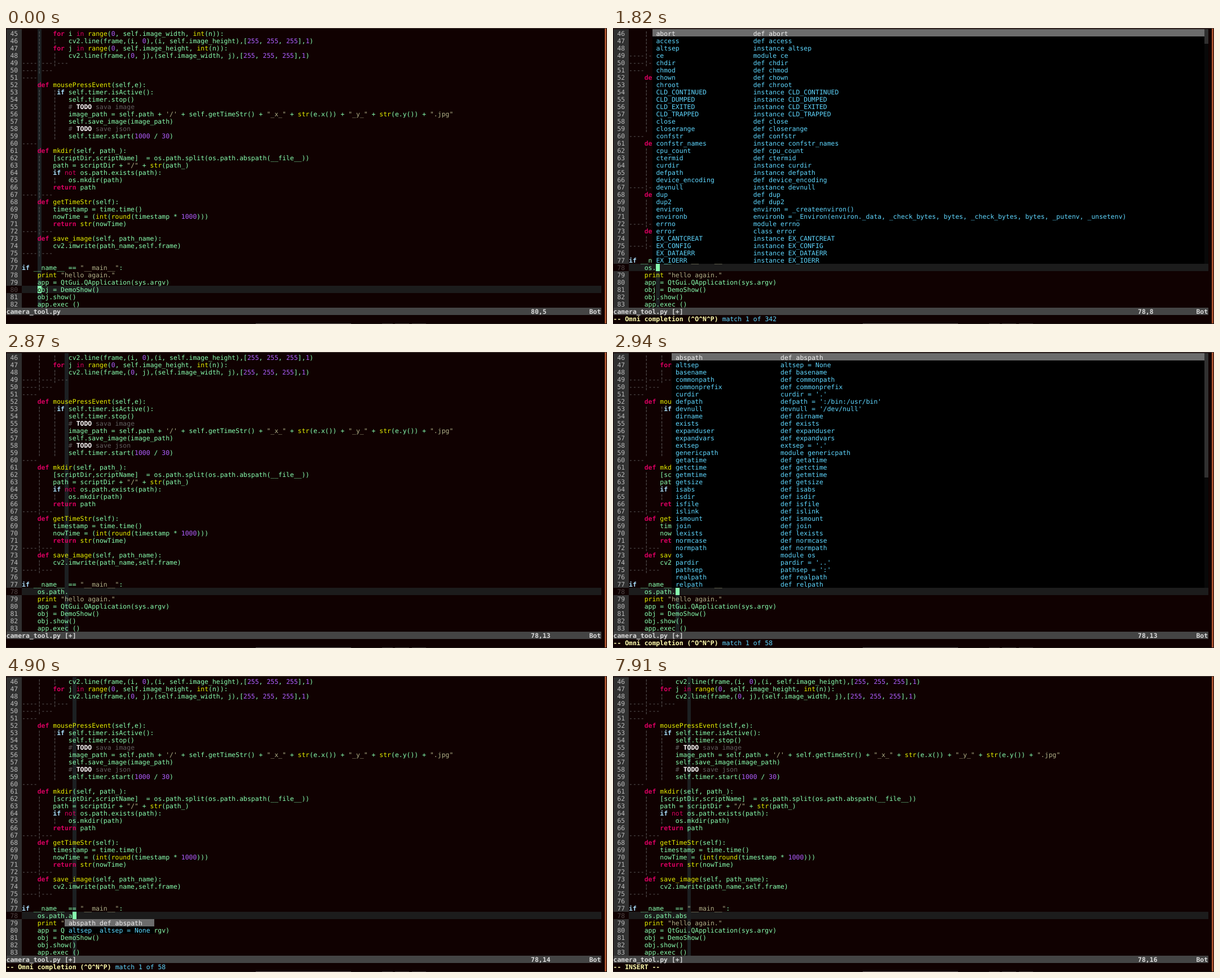
An HTML page for the animation above (8000 ms loop, 1066 px wide and 526 px high).

```html
<!DOCTYPE html>
<html lang="en">
<head>
<meta charset="utf-8">
<title>Editor completion</title>
<style>
  html, body { margin: 0; width: 100%; height: 100%; overflow: hidden; background: #100101; }
  #stage { position: relative; width: 1066px; height: 526px; overflow: hidden; background: #100101; }
  #stage div { position: absolute; box-sizing: border-box; padding-top: 1.4px; white-space: pre; color: #87ffaf;
    font: 11.458px/13.016px "DejaVu Sans Mono", monospace; letter-spacing: 0.007px;
    text-rendering: geometricPrecision; font-variant-ligatures: none; }
  #stage div.gutter { background: #303030; color: #bcbcbc; }
  #stage div.here { background: #100101; color: #4e4545; }
  #stage div.line { background: #1c1c1c; }
  #stage div.column { background: #1c2022; }
  #stage div.cursor { background: #87ffaf; color: #100101; }
  #stage div.menu { background: #000; color: #5fd7ff; }
  #stage div.chosen { background: #6c6c6c; color: #eee; }
  #stage div.track { background: #080808; }
  #stage div.thumb { background: #303030; }
  #stage div.status { background: #444; color: #dadada; font-weight: bold; }
  #stage div.mode { color: #ffffaf; font-weight: bold; }
  #stage div.count { color: #5fd7ff; }
  .key { color: #d7005f; font-weight: bold; }
  .cond { color: #a8e0ff; font-weight: bold; }
  .op { color: #d7005f; }
  .fn { color: #e6f000; }
  .num { color: #af5fff; }
  .str { color: #afaf87; }
  .com, .blank { color: #5f5f5f; }
  .com b { color: #fff; }
  .edge { position: absolute; }
</style>
</head>
<body>
<div id="stage"></div>
<script>
const CELL_W = 6.898, CELL_H = 13.016, LEFT = 0.53, TOP = 2.2;
const COLS = 153, ROWS = 38, GUTTER = 4, FIRST = 45, LOOP = 8000;
const stage = document.getElementById("stage");

const head = `        for i in range(0, self.image_width, int(n)):
            cv2.line(frame,(i, 0),(i, self.image_height),[255, 255, 255],1)
        for j in range(0, self.image_height, int(n)):
            cv2.line(frame,(0, j),(self.image_width, j),[255, 255, 255],1)
----¦---¦---
----¦---
----
    def mousePressEvent(self,e):
         if self.timer.isActive():
            self.timer.stop()
            # TODO sava image
            image_path = self.path + '/' + self.getTimeStr() + "_x_" + str(e.x()) + "_y_" + str(e.y()) + ".jpg"
            self.save_image(image_path)
            # TODO save json
            self.timer.start(1000 / 30)
----
    def mkdir(self, path_):
        [scriptDir,scriptName]  = os.path.split(os.path.abspath(__file__))
        path = scriptDir + "/" + str(path_)
        if not os.path.exists(path):
            os.mkdir(path)
        return path
----¦---
    def getTimeStr(self):
        timestamp = time.time()
        nowTime = (int(round(timestamp * 1000)))
        return str(nowTime)
----¦---
    def save_image(self, path_name):
        cv2.imwrite(path_name,self.frame)
----¦---

if __name__ == "__main__":`.split("\n");
const tail = `    print "hello again."
    app = QtGui.QApplication(sys.argv)
    obj = DemoShow()
    obj.show()
    app.exec_()`.split("\n");

// Menu entries: a bare word is a def, i/m/c name another kind, "=" keeps the assignment.
const kinds = { i: "instance", m: "module", c: "class" };
const parse = list => list.split("|").map(entry => {
  const [, tag, rest] = entry.match(/^(?:([imc=]) )?(.*)$/);
  const word = rest.split(" ")[0];
  return [word, tag === "=" ? rest : `${kinds[tag] || "def"} ${word}`];
});
const osItems = parse("abort|access|i altsep|m ce|chdir|chmod|chown|chroot|i CLD_CONTINUED|i CLD_DUMPED|" +
  "i CLD_EXITED|i CLD_TRAPPED|close|closerange|confstr|i confstr_names|cpu_count|ctermid|i curdir|" +
  "i defpath|device_encoding|i devnull|dup|dup2|= environ = _createenviron()|" +
  "= environb = _Environ(environ._data, _check_bytes, bytes, _check_bytes, bytes, _putenv, _unsetenv)|" +
  "m errno|c error|i EX_CANTCREAT|i EX_CONFIG|i EX_DATAERR|i EX_IOERR");
const pItems = parse("i pardir|m path|pathconf|i pathconf_names|i pathsep|pipe|pipe2|popen|" +
  "posix_fadvise|posix_fallocate|pread|putenv|pwrite");
const pathItems = parse("abspath|= altsep = None|basename|commonpath|commonprefix|= curdir = '.'|" +
  "= defpath = ':/bin:/usr/bin'|= devnull = '/dev/null'|dirname|exists|expanduser|expandvars|" +
  "= extsep = '.'|m genericpath|getatime|getctime|getmtime|getsize|isabs|isdir|isfile|islink|ismount|" +
  "join|lexists|normcase|normpath|m os|= pardir = '..'|= pathsep = ':'|realpath|relpath");
const startsWith = (items, prefix) => items.filter(([word]) => word.startsWith(prefix));

const osMenu = { col: 6, total: 342 }, pathMenu = { col: 11, total: 58 };
const osFull = { ...osMenu, items: osItems, gap: 25, thumb: 2 };
const pathFull = { ...pathMenu, items: pathItems, gap: 27, thumb: 17 };
const osPart = p => ({ ...osMenu, items: startsWith(pItems, p) });
const pathPart = p => ({ ...pathMenu, items: startsWith(pathItems, p) });

const steps = [
  { t: 0, line: 80 },
  { t: 70, line: 79 },
  { t: 350, line: 78 },
  { t: 560, line: 77 },
  { t: 840, typed: "" },
  { t: 1330, typed: "o" },
  { t: 1470, typed: "os" },
  { t: 1820, typed: "os.", menu: osFull },
  { t: 2170, typed: "os.p", menu: osPart("p") },
  { t: 2310, typed: "os.pa", menu: osPart("pa") },
  { t: 2450, typed: "os.pat", menu: osPart("pat") },
  { t: 2590, typed: "os.path", menu: osPart("path") },
  { t: 2870, typed: "os.path.", quiet: true, hidden: true, columnAt: 11 },
  { t: 2940, typed: "os.path.", menu: pathFull },
  { t: 3570, typed: "os.path.", menu: pathFull, hidden: true },
  { t: 4200, typed: "os.path.", menu: pathFull },
  { t: 4900, typed: "os.path.a", menu: pathPart("a") },
  { t: 5110, typed: "os.path.ab", menu: pathPart("ab") },
  { t: 5250, typed: "os.path.abs", menu: pathPart("abs") },
  { t: 5670, typed: "os.path.absd" },
  { t: 6370, typed: "os.path.abs" },
  { t: 6930, typed: "os.path.abs", hidden: true },
  { t: 7140, typed: "os.path.ab" },
  { t: 7350, typed: "os.path.abs" },
  { t: 7910, typed: "os.path.abs", hidden: true }
];

const span = (cls, text) => `<span class="${cls}">${text}</span>`;
const classes = ["com", "str", "key", "cond", "op", "fn", "num"];
const syntax = /(#.*$)|("[^"]*"|'[^']*')|\b(def|for|return)\b|\b(if)\b|\b(in|not)\b|((?<=def )\w+|\b(?:range|int|str|round|print)\b)|\b(\d+)\b/g;

function paintCode(text) {
  if (text.startsWith("-")) return span("blank", text);
  const indent = text.search(/\S|$/);
  let guides = "";
  for (let i = 0; i < indent; i++) guides += i && i % 4 === 0 ? "¦" : " ";
  const code = text.slice(indent).replace(syntax, (match, ...groups) =>
    span(classes[groups.findIndex(g => g !== undefined)], match.replace("TODO", "<b>TODO</b>")));
  return span("blank", guides) + code;
}

// Places a block on the character grid; coordinates are in cells.
function put(cls, col, row, w, h, html = "") {
  return `<div class="${cls}" style="left:${(LEFT + col * CELL_W).toFixed(2)}px;top:${(TOP + row * CELL_H).toFixed(2)}px;` +
    `width:${(w * CELL_W).toFixed(2)}px;height:${(h * CELL_H).toFixed(2)}px">${html}</div>`;
}

const edge = (x, y, w, h, color) =>
  `<i class="edge" style="left:${x}px;top:${y}px;width:${w}px;height:${h}px;background:${color}"></i>`;
const frame = edge(0, 0, 1066, 1, "#4a3f3c") + edge(1062, 1, 3, 524, "#a9532f") +
  edge(0, 525, 1066, 1, "#1f1a19") + edge(443, 525, 169, 1, "#6a6664") +
  edge(667, 525, 19, 1, "#4c4846") + edge(690, 525, 25, 1, "#4c4846") + edge(720, 525, 25, 1, "#4c4846");

function paintMenu(menu, row) {
  const { items, thumb } = menu;
  const col = GUTTER + menu.col;
  const longest = part => Math.max(...items.map(item => item[part].length));
  const gap = menu.gap || longest(0) + 1;
  const width = thumb ? COLS - 1 - col : 1 + gap + longest(1) + 1;
  const top = items.length >= 5 ? row - items.length : row + 1;
  const lines = items.map(([word, info]) => " " + word.padEnd(gap) + info);
  let html = put("menu", col, top, width, lines.length, lines.join("\n")) +
    put("chosen", col, top, width, 1, lines[0]);
  if (thumb) {
    html += put("track", COLS - 1, top, 1, lines.length) + put("thumb", COLS - 1, top, 1, thumb);
  }
  return html;
}

function paint({ line = 78, typed, menu, quiet, hidden, columnAt }) {
  const inserting = typed !== undefined;
  const first = FIRST + (inserting ? 1 : 0);
  const current = typed ? ["    " + typed] : ["----"];
  const lines = [...head, ...(inserting ? current : []), ...tail].slice(first - FIRST);
  const row = line - first;
  const col = 4 + (typed || "").length;
  const numbers = lines.map((_, i) => ` ${first + i} `);

  let html = put("gutter", 0, 0, GUTTER, ROWS, numbers.join("\n")) +
    put("here", 0, row, GUTTER, 1, numbers[row]) +
    put("line", GUTTER, row, COLS - GUTTER, 1) +
    put("column", GUTTER + (columnAt || col), 0, 1, ROWS) +
    put("code", GUTTER, 0, COLS - GUTTER, ROWS, lines.map(paintCode).join("\n"));
  if (menu) html += paintMenu(menu, row);
  if (!hidden) html += put("cursor", GUTTER + col, row, 1, 1, lines[row][col] || "");

  const name = "camera_tool.py" + (inserting ? " [+]" : "");
  html += put("status", 0, ROWS, COLS, 1, name.padEnd(135) + `${line},${col + 1}`.padEnd(15) + "Bot");
  if (menu) {
    html += put("mode", 0, ROWS + 1, 28, 1, "-- Omni completion (^O^N^P)") +
      put("count", 28, ROWS + 1, 20, 1, `match 1 of ${menu.total}`);
  } else if (inserting && !quiet) {
    html += put("mode", 0, ROWS + 1, 28, 1, "-- INSERT --");
  }
  stage.innerHTML = html + frame;
}

let shown;
function tick() {
  const now = performance.now() % LOOP;
  const step = steps.findLast(s => s.t <= now);
  if (step !== shown) paint(shown = step);
  requestAnimationFrame(tick);
}
tick();
</script>
</body>
</html>
```
